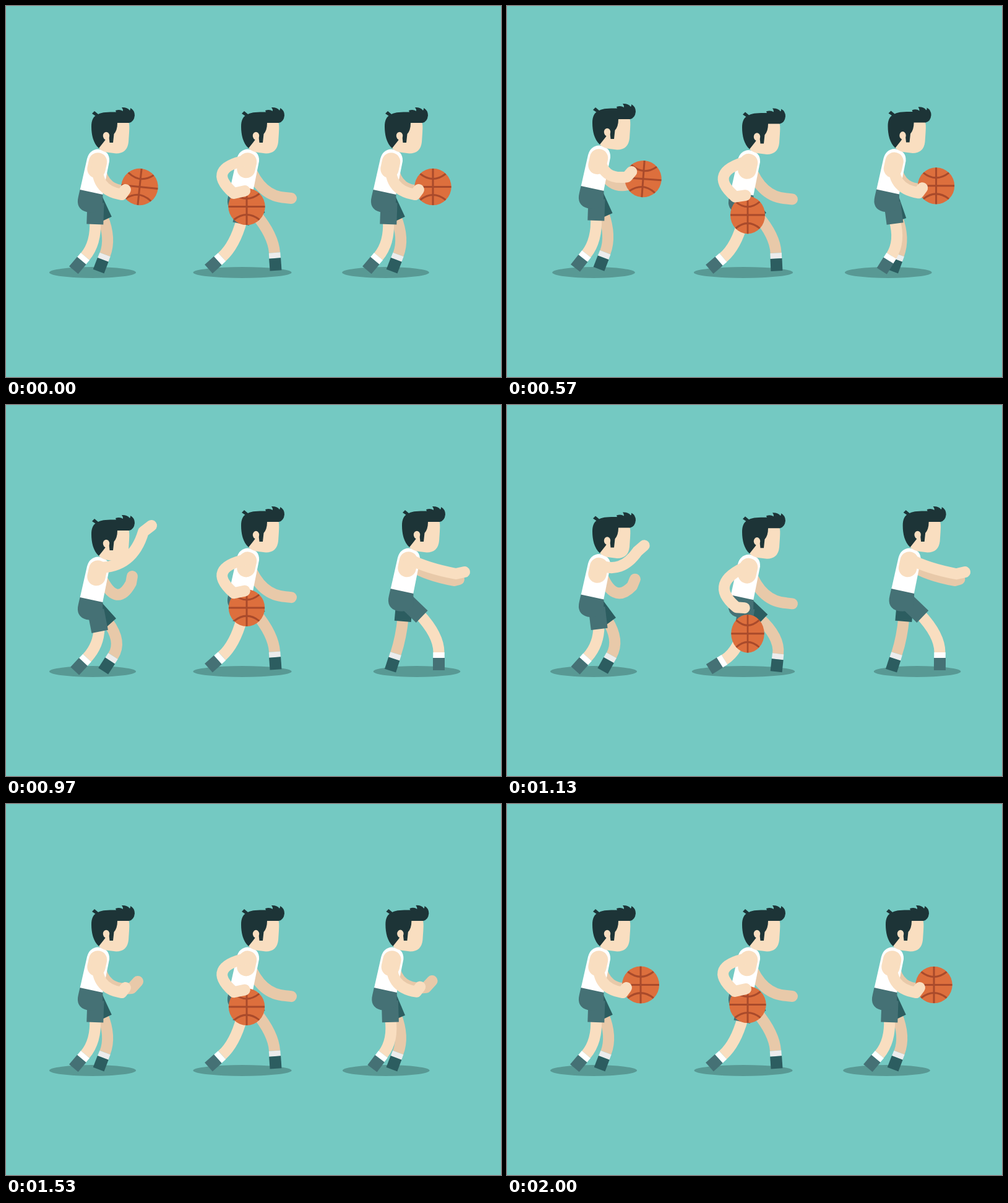
These frames come from a looping animation (800x600 px, 2.03 s). An HTML page with a canvas:

```html
<!DOCTYPE html>
<html lang="en">
<head>
<meta charset="utf-8">
<title>Basketball drills</title>
<style>
html, body { margin: 0; width: 100%; height: 100%; overflow: hidden; background: #74c9c2; }
canvas { display: block; }
</style>
</head>
<body>
<canvas id="stage" width="800" height="600"></canvas>
<script>
const ctx = document.getElementById('stage').getContext('2d');
const LOOP = 2030, GROUND = 431, RADIUS = 29.7;
const BG = '#74c9c2', HAIR = '#1d3437', BALL = '#dd6f3d', SEAM = '#a94a2b';
const NEAR = { skin: '#f9dec0', cloth: '#457175', sock: '#ffffff', hip: [145, 318], thigh: 35 };
const FAR = { skin: '#e8c9a9', cloth: '#2c5d60', sock: '#ececec', hip: [142.5, 312], thigh: 38 };

// Legs: thigh angle, ankle x, ankle y, foot angle. Angles are degrees forward of straight down.
const STAND = { near: [-2, 128, 405, -40], far: [25, 160, 402, -21] };
const CROUCH = { near: [11, 131, 409, -43], far: [42, 173, 406, -33] };
const AIR = { near: [-2, 130.5, 382, -30], far: [22, 153, 381, -20] };
const LUNGE = { near: [46, 225.5, 400, 0], far: [-5, 156, 402, -18] };
const TALL = { near: [-12, 107, 406, -48], far: [38, 192, 399, 4] };
const LOW = { near: [-9, 110, 413, -60], far: [48, 197, 403, -8] };

// Arms: bend, wrist and fingertip, relative to the body.
const HOLD = { near: [141, 298, 187, 305, 193, 297], far: [158, 304, 203, 298, 213, 287] };
const SHOT = { near: [205, 249, 222, 191, 235, 181], far: [178, 318, 202, 274, 204, 263] };
const PASS = { near: [178, 264, 225, 273, 239, 270], far: [178, 276, 222, 284, 230, 282] };
const HIGH = { near: [79, 262, 126, 303, 144, 299], far: [170, 308, 210, 310, 219, 311] };
const PUSH = { near: [82, 289, 131, 328, 140, 333], far: HIGH.far };

const face = new Path2D('M160 188H198Q200 190 199 205L198 220Q196 238.500 178 238.500L166 237Q156 236 150 230L160 213Z');
const hair = new Path2D('M150 230C141 222 138 208 138 195C138 185 141 179 146.500 176.500L145 178L139 174L143 170L149 175C156 171.500 164 171.500 178 171.500L177 169Q184 166.500 189 170Q189 166 187 164Q196 163.500 200 169Q201.500 167 201 165Q208 168.500 208 177Q207 187 199 189H180Q180 201 174.500 207L173 221H167.500L166 207L159.500 218Z');
const shirt = new Path2D('M119.500 298L131 247Q135 232 149 231.500Q168 234 167 251L156 306Z');
const pelvis = new Path2D('M119.500 297L156.500 305L156 325Q150 336 130 333Q112 328 117 308Z');

const clamp = v => Math.max(0, Math.min(1, v));
const smooth = v => { const u = clamp(v); return u * u * (3 - 2 * u); };
const ramp = (n, from, to) => smooth((n - from) / (to - from));
const mix = (a, b, k) => a.map((v, i) => v + (b[i] - v) * k);
const blend = (a, b, k) => ({ near: mix(a.near, b.near, k), far: mix(a.far, b.far, k) });
const shift = (points, dx, dy) => points.map((v, i) => v + (i % 2 ? dy : dx));
const polar = ([x, y], degrees, length) => {
  const a = degrees * Math.PI / 180;
  return [x + length * Math.sin(a), y + length * Math.cos(a)];
};
// Grows past full size, then settles over nine steps.
function pop(k) {
  if (k <= 0) return 0;
  const u = Math.min(1, k / 9) - 1;
  return 1 + 3.5 * u ** 3 + 2.5 * u ** 2;
}

function fill(path, color) {
  ctx.fillStyle = color;
  ctx.fill(path);
}
function ellipse(x, y, rx, ry, color) {
  ctx.fillStyle = color;
  ctx.beginPath();
  ctx.ellipse(x, y, rx, ry, 0, 0, 7);
  ctx.fill();
}
// Two points make a line; three make a bend, and later points are joined straight.
function stroke(p, width, color, cap = 'butt') {
  ctx.beginPath();
  ctx.moveTo(p[0], p[1]);
  if (p.length > 4) ctx.quadraticCurveTo(p[2], p[3], p[4], p[5]);
  else ctx.lineTo(p[2], p[3]);
  for (let i = 6; i < p.length; i += 2) ctx.lineTo(p[i], p[i + 1]);
  ctx.lineWidth = width;
  ctx.strokeStyle = color;
  ctx.lineCap = cap;
  ctx.lineJoin = 'round';
  ctx.stroke();
}
const shadow = (x, rx, ry = 9) => ellipse(x, GROUND, rx, ry, 'rgba(0,0,0,.24)');

function ball(x, y, sx = 1, sy = sx, turn = 0) {
  if (sx <= 0) return;
  ctx.save();
  ctx.translate(x, y);
  ctx.scale(sx, sy);
  ctx.rotate(turn * Math.PI / 180);
  ellipse(0, 0, RADIUS, RADIUS, BALL);
  stroke([-29.5, 0, 29.5, 0], 3, SEAM);
  stroke([0, -29.5, 0, 29.5], 3, SEAM);
  for (const s of [-1, 1]) stroke([-20.5, 21 * s, 0, 5 * s, 20.5, 21 * s], 3, SEAM);
  ctx.restore();
}
function leg(side, [swing, x, y, foot], body) {
  const hip = shift(side.hip, ...body), ankle = [x, y];
  const hem = polar(hip, swing, side.thigh);
  const heel = polar(ankle, foot, 9);
  stroke([...polar(hem, swing, -6), ...polar(ankle, foot, -28), ...ankle], 18, side.skin);
  stroke([...ankle, ...heel], 18.5, side.sock);
  stroke([...heel, ...polar(ankle, foot, 29)], 19, side.cloth);
  stroke([...hip, ...hem], 27, side.cloth);
}
function player(x, body, legs, arms, drawBall) {
  const at = (dx, dy, draw) => {
    ctx.save();
    ctx.translate(dx, dy);
    draw();
    ctx.restore();
  };
  const onBody = draw => at(x + body[0], body[1], draw);
  onBody(() => stroke([151, 259, ...arms.far], 18, FAR.skin, 'round'));
  at(x, 0, () => leg(FAR, legs.far, body));
  onBody(() => fill(shirt, '#fff'));
  at(x, 0, () => leg(NEAR, legs.near, body));
  onBody(() => {
    fill(pelvis, NEAR.cloth);
    fill(face, NEAR.skin);
    fill(hair, HAIR);
    ellipse(162, 210, 5.2, 6.3, NEAR.skin);
  });
  drawBall();
  onBody(() => {
    stroke([148.5, 252, 146, 263.5], 29.5, NEAR.skin, 'round');
    stroke([149, 249, ...arms.near], 18, NEAR.skin, 'round');
  });
}

function drawShooter(n) {
  const load = ramp(n, 0, 10) - ramp(n, 12, 16);
  const bend = load + ramp(n, 27.5, 29) - ramp(n, 31, 39);
  const lift = Math.max(0, 1 - ((n - 22) / 5.5) ** 2);
  const raise = ramp(n, 15, 22) - ramp(n, 31, 39);
  const hold = { near: HOLD.near, far: shift(HOLD.far, 0, 7 * bend) };
  const flight = Math.max(0, n - 16) ** 1.5;
  shadow(140, 70 + 6.5 * load - 18.5 * lift);
  player(0, [0, 14 * bend - 35 * lift], blend(blend(STAND, CROUCH, bend), AIR, lift), blend(hold, SHOT, raise), () => {
    if (n < 27) ball(216 + 4 * flight, 292.5 + 12 * load - 12.9 * flight, 1, 1, 6 - 1.8 * flight);
    else ball(216, 292.5, pop(n - 51.6));
  });
}
function drawDribbler(n) {
  const p = n % 15, turn = 2 * Math.PI * p / 15;
  const fall = (1 - Math.cos(turn)) / 2;
  const dip = smooth(fall / 0.75);
  const speed = Math.sin(turn) ** 2;
  const squash = 0.12 * Math.exp(-2 * (p - 6.8) ** 2);
  shadow(382, 79.5 + 4.5 * dip);
  player(242, [0, 12.5 * dip], blend(TALL, LOW, dip), blend(HIGH, PUSH, fall),
    () => ball(389, 324.5 + 82 * fall, 1 - 0.1 * speed + squash, 1 + 0.04 * speed - squash));
}
function drawPasser(n) {
  const step = ramp(n, 15, 24) - ramp(n, 33, 48);
  const push = ramp(n, 22, 26) - ramp(n, 33, 47);
  const stride = Math.sin(step * Math.PI / 2);
  const ready = { near: shift(HOLD.near, 5 * step, -17 * step), far: shift(HOLD.far, 0, -17 * step) };
  const thrown = n < 33;
  const x = 690 + 28 * step + 10 * Math.max(0, n - 22) ** 2;
  const cast = thrown ? clamp((n - 20) / 3) : 0;
  shadow(613.5 + 50.5 * step ** 1.4, 70.3);
  if (cast > 0) shadow(x + 9, 29 * cast, 5.3 * cast);
  player(474, [28 * step, -4 * Math.sin(Math.PI * step) ** 2], blend(STAND, LUNGE, stride), blend(ready, PASS, push), () => {
    if (thrown) ball(x, 292.5 - 13 * step);
    else ball(690, 292.5, pop(n - 47));
  });
}

const start = performance.now();
function draw() {
  const t = (performance.now() - start) % LOOP;
  const n = Math.min(60, Math.floor((t + 4) * 0.03));
  ctx.fillStyle = BG;
  ctx.fillRect(0, 0, 800, 600);
  drawShooter(n);
  drawDribbler(n);
  drawPasser(n);
  requestAnimationFrame(draw);
}
draw();
</script>
</body>
</html>
```
